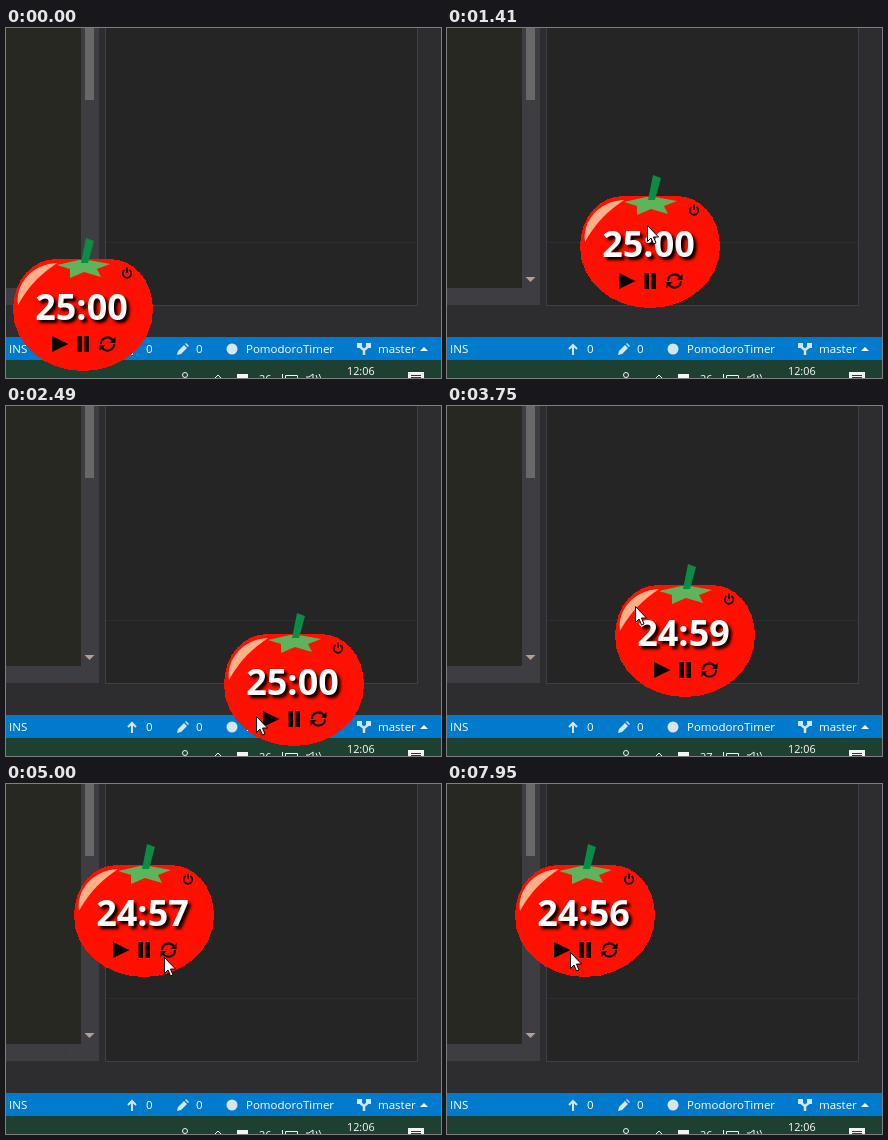
Animation, 435 px wide and 350 px high, one loop 8 s. Source, as an HTML page:

```html
<!DOCTYPE html>
<html lang="en">
<head>
<meta charset="utf-8">
<title>Tomato timer</title>
<style>
  html, body { margin: 0; width: 100%; height: 100%; overflow: hidden; background: #2d2d30; }
  svg { display: block; }
  text { font: 11.5px "Open Sans", "Noto Sans", sans-serif; fill: #fff; }
  #digits { font-size: 36px; font-weight: 700; text-anchor: middle; filter: drop-shadow(3px 3px 1.5px #000); }
  .line { fill: none; stroke: #d8e4ee; }
</style>
</head>
<body>
<svg width="435" height="350" viewBox="0 0 435 350">
  <!-- Editor -->
  <rect width="435" height="350" fill="#2d2d30"/>
  <rect width="75" height="260" fill="#272822"/>
  <path d="M75 0H93V277H0V260H75Z" fill="#3e3e42"/>
  <rect x="79" width="9" height="72" fill="#686868"/>
  <path d="M78.5 249h10l-5 5z" fill="#b0a096"/>
  <path d="M64 264l5 3.5-5 3.5z" fill="#37424d"/>
  <path d="M99.5 -1V277.5H411.5V-1Z" fill="#252526" stroke="#3f3f46"/>
  <path d="M100 214.5H411" stroke="#2d2d30"/>

  <!-- Status bar -->
  <rect y="309" width="435" height="23" fill="#007acc"/>
  <text x="3" y="325">INS</text>
  <text x="140" y="325">0</text>
  <text x="190" y="325">0</text>
  <text x="240" y="325">PomodoroTimer</text>
  <text x="372" y="325">master</text>
  <path class="line" stroke-width="2" d="M126 327V318M122 321l4-4 4 4"/>
  <path fill="#d8e4ee" d="M171 327l1-4 6-6 3 3-6 6zM179 316l1-1 3 3-1 1z"/>
  <circle cx="226" cy="321" r="5.5" fill="#d8e4ee"/>
  <path class="line" stroke-width="2.5" d="M358 327V322L353 318M358 322L363 318"/>
  <path fill="#d8e4ee" d="M351 315h5v5h-5zM360 315h5v5h-5z"/>
  <path fill="#fff" d="M414 323h8l-4-4z"/>

  <!-- Taskbar -->
  <rect y="332" width="435" height="18" fill="#1d4031"/>
  <g class="line" style="stroke:#f2f5f3">
    <circle cx="179" cy="347" r="2.5"/>
    <path d="M174 353q5-5 10 0M208 351l4-4 4 4"/>
    <path d="M279.5 347.5h12v6h-12zM276.5 346v5M300 349h3l4-3v6M310 347q2 3 0 5M313 346q3 4 0 6"/>
  </g>
  <path fill="#f2f5f3" d="M231 346h11v6h-11zM402 344h16v11h-16z"/>
  <path stroke="#1d4031" d="M405 347.5h10M405 349.5h10"/>
  <text id="load" x="253" y="355" style="font-size:11px"></text>
  <text x="341" y="346.5" style="font-size:10.8px">12:06</text>

  <g id="tomato">
    <path shape-rendering="crispEdges" fill="#ff1000" d="M0 51C0 20 20 0 44 0H96C120 0 140 20 140 51C140 85 109 112 70 112S0 85 0 51Z"/>
    <path fill="#ffb088" d="M5 46C2 26 18 5 44 4C32 13 20 20 5 46Z"/>
    <path fill="#5fb35a" d="M44 6L66 1H75L97 5 84 10 88 18 71 13 57 19 57 10Z"/>
    <path fill="#0a8c44" d="M73 -21L81 -18 75 4H68Z"/>
    <text id="digits" x="68.5" y="61"></text>
    <g fill="#0c0606">
      <path d="M39 77L55.5 85 39 93ZM64.5 77H69V93H64.5ZM71.5 77H76V93H71.5Z"/>
      <path d="M102.5 78v6h-6zM86.5 92v-6h6z"/>
    </g>
    <g fill="none" stroke="#0c0606" stroke-width="2">
      <path d="M88 85A6.5 6.5 0 0 1 100 81.500M101 85A6.5 6.5 0 0 1 89 88.500"/>
      <path stroke-width="1.7" d="M111.5 11A4.3 4.3 0 1 0 116.5 11M114 8.5V14"/>
    </g>
  </g>

  <path id="cursor" fill="#fff" stroke="#000" d="M.5 .5V16.5L4 13 6.5 19 9 18 6.5 12H11.5Z"/>
</svg>
<script>
const LOOP = 8000, TICK = 155.9;
const START = [308, 333];

// Pointer journeys: first tick, last tick, destination.
const journeys = [
  [1, 5, 74, 260],     // to the tomato
  [5, 7, 97, 236],     // drag it right
  [7, 9, 200, 197],
  [9, 12, 285, 257],
  [13, 16, 250, 310],  // press play
  [16, 19, 260, 313],
  [20, 22, 238, 249],  // grab it again
  [23, 26, 88, 102],   // drag it up
  [26, 28, 150, 172],
  [30, 31, 158, 173],
  [33, 35, 143, 166],  // pause
  [37, 40, 159, 166],  // reset
  [49, 51, 123, 168]   // back to play
];

const clamp = (v, lo, hi) => Math.min(hi, Math.max(lo, v));
const el = id => document.getElementById(id);
const move = (id, [x, y]) => el(id).setAttribute("transform", `translate(${x} ${y})`);

function pointerAt(tick) {
  return journeys.reduce(([x, y], [from, to, endX, endY]) => {
    const p = clamp((tick - from) / (to - from), 0, 1);
    return [x + (endX - x) * p, y + (endY - y) * p].map(Math.round);
  }, START);
}

// A drag keeps the offset at which the tomato was grabbed.
function tomatoAt(tick) {
  const follow = (from, to, dx, dy) => {
    const [x, y] = pointerAt(clamp(tick, from, to));
    return [x - dx, y - dy];
  };
  return tick < 23 ? follow(5, 12, 67, 29) : follow(23, 26, 20, 21);
}

function draw(now) {
  const tick = Math.floor((now % LOOP + 10) / TICK);
  const elapsed = clamp(Math.floor((tick * TICK - 1920) / 1000), 0, 4);
  move("cursor", tick ? pointerAt(tick) : [-50, 0]);
  move("tomato", tomatoAt(tick));
  el("digits").textContent = elapsed ? `24:${60 - elapsed}` : "25:00";
  el("load").textContent = elapsed === 1 || elapsed === 2 ? 27 : 26;
  requestAnimationFrame(draw);
}
draw(0);
</script>
</body>
</html>
```
